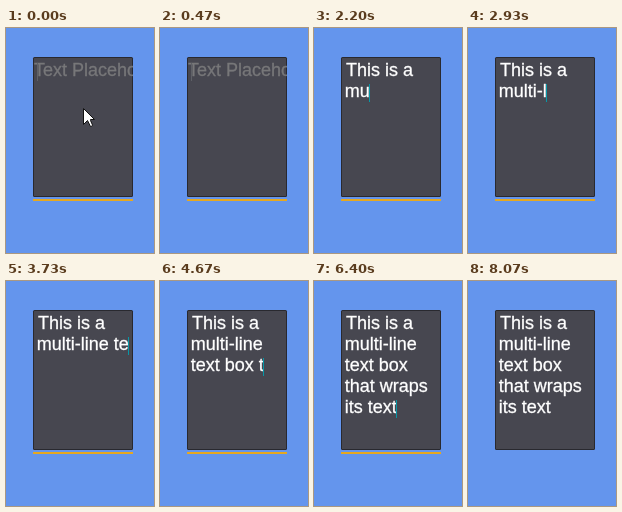
Write an HTML page with a canvas that moves like this. It is 148 px wide and 225 px high and loops after 8.54 s.

```html
<!DOCTYPE html>
<html lang="en">
<head>
<meta charset="utf-8">
<title>Multi-line text box</title>
<style>
  html, body { margin: 0; width: 100%; height: 100%; overflow: hidden; background: #6495ed; }
  canvas { display: block; width: 148px; height: 225px; }
</style>
</head>
<body>
<canvas id="stage" width="148" height="225"></canvas>
<script>
const ctx = document.getElementById('stage').getContext('2d');

const LOOP = 8540;
const POINTER_END = 470;
const TYPE_START = 1270;
const BLUR_AT = 8070;
const TEXT = 'This is a multi-line text box that wraps its text';
const WRAP = 95;
const LINE = 21;
const TOP = 35;
const BASE = 13;

// Typing pace: [time, characters typed], steady in between
const PACE = [
  [TYPE_START, 1], [1670, 7], [2000, 11], [2200, 12], [2670, 16], [2930, 17],
  [3270, 21], [3530, 22], [3930, 24], [4870, 34], [5600, 43], [6400, 49]
];

const width = s => ctx.measureText(s).width;
const lineX = row => row === 0 ? 32 : 30.7;

function rect(color, x, y, w, h) {
  ctx.fillStyle = color;
  ctx.fillRect(x, y, w, h);
}

function roundBox(color, x, y, w, h, r) {
  ctx.fillStyle = color;
  ctx.beginPath();
  ctx.roundRect(x, y, w, h, r);
  ctx.fill();
}

// A hairline stroke gives the glyphs a slightly heavier weight
function label(color, text, x, y) {
  ctx.fillStyle = ctx.strokeStyle = color;
  ctx.lineWidth = 0.3;
  ctx.fillText(text, x, y);
  ctx.strokeText(text, x, y);
}

function typedCount(t) {
  const next = PACE.findIndex(([time]) => time > t);
  if (next < 0) return TEXT.length;
  const [t0, n0] = PACE[next - 1];
  const [t1, n1] = PACE[next];
  return Math.floor(n0 + (n1 - n0) * (t - t0) / (t1 - t0));
}

function wrap(text) {
  const lines = [''];
  for (const word of text.match(/\S+\s*/g)) {
    const row = lines.length - 1;
    if (lines[row] && width(lines[row] + word.trimEnd()) > WRAP) lines.push(word);
    else lines[row] += word;
  }
  return lines;
}

function drawBox(focused) {
  roundBox('#29292f', 27, 29, 100, 140, 1.5);
  roundBox('#474750', 28, 30, 98, 138, 0.5);
  if (focused) rect('#e6a820', 27, 171, 100, 2);
}

function drawPlaceholder() {
  ctx.save();
  ctx.beginPath();
  ctx.rect(27, 29, 100, 140);
  ctx.clip();
  label('#777779', 'Text Placeholder', 28, TOP + BASE);
  ctx.restore();
  rect('#5e6066', 31, TOP, 1, 18);
}

function drawTyped(t) {
  const lines = wrap(TEXT.slice(0, typedCount(t)));
  lines.forEach((line, row) => label('#fff', line, lineX(row), TOP + BASE + row * LINE));
  if (t >= BLUR_AT) return;

  const row = lines.length - 1;
  const word = lines[row].trimEnd();
  const gap = word === lines[row] ? 0 : 2;
  rect('#0797a7', Math.floor(lineX(row) + width(word) + gap), TOP + row * LINE, 1, 18);
}

function drawPointer(t) {
  const x = t < 400 ? 77 : 78;
  const y = Math.round(80 - 6 * Math.min(t / 130, 1));
  const shape = [[0, 0], [0, 16], [4, 12], [7, 18], [8, 18], [9, 16.5], [7, 12], [7, 11], [11, 11]];
  ctx.beginPath();
  for (const [dx, dy] of shape) ctx.lineTo(x + 0.5 + dx, y + 0.5 + dy);
  ctx.closePath();
  ctx.fillStyle = '#fff';
  ctx.fill();
  ctx.strokeStyle = '#111';
  ctx.lineWidth = 1;
  ctx.stroke();
}

function draw(t) {
  rect('#6495ed', 0, 0, 148, 225);
  drawBox(t < BLUR_AT);
  ctx.font = '18px "Liberation Sans", Arial, sans-serif';
  if (t < TYPE_START) drawPlaceholder();
  else drawTyped(t);
  if (t < POINTER_END) drawPointer(t);
}

const start = performance.now();
function tick() {
  draw((performance.now() - start) % LOOP);
  requestAnimationFrame(tick);
}
tick();
</script>
</body>
</html>
```
